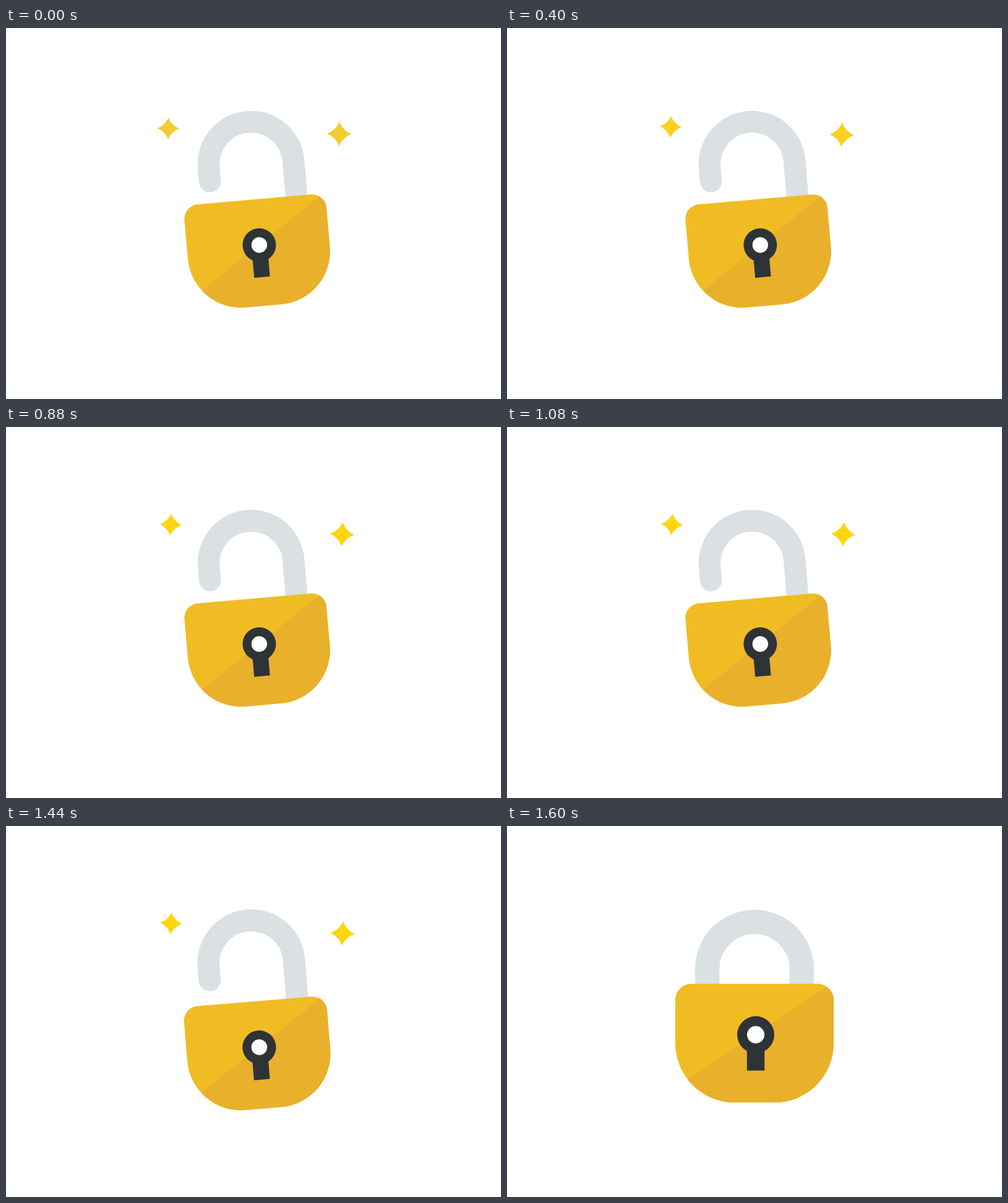
Animation, 800 px wide and 600 px high, one loop 2.6 s. Source, as an HTML page:

```html
<!DOCTYPE html>
<html lang="en">
<head>
<meta charset="utf-8">
<title>Padlock</title>
<style>
  html, body { margin: 0; width: 100%; height: 100%; overflow: hidden; background: #fff; }
  svg { display: block; width: 100vw; height: 100vh; }
</style>
</head>
<body>
<svg viewBox="0 0 800 600">
  <defs>
    <clipPath id="bodyClip">
      <path id="bodyShape" d="M-102-96H102A26 26 0 0 1 128-70V0A96 96 0 0 1 32 96H-32A96 96 0 0 1-128 0V-70A26 26 0 0 1-102-96Z"/>
    </clipPath>
  </defs>
  <g id="shackle" fill="none" stroke="#dbe0e3" stroke-width="39.4">
    <path d="M-76.3 24.3V0A76.3 76.3 0 0 1 76.3 0V80" stroke-linecap="round"/>
  </g>
  <g id="body">
    <use href="#bodyShape" fill="#f1bc23"/>
    <path d="M128-98.7L-128 72.3V96H128Z" fill="#e9b02b" clip-path="url(#bodyClip)"/>
    <path d="M-12.2-4H16.2V44.2H-12.2Z" fill="#2e3337"/>
    <circle cx="2" cy="-13.7" r="30" fill="#2e3337"/>
    <circle cx="2" cy="-13.7" r="14.1" fill="#fff"/>
  </g>
  <path id="starL"/>
  <path id="starR"/>
</svg>
<script>
const LOOP = 2600, STEP = 40;
const CLOSE_AT = 1280, CLOSED = 1600, POP_AT = 1440, DRIFT = 1360;

const $ = id => document.getElementById(id);
const clamp = x => Math.min(1, Math.max(0, x));
const mix = (a, b, p) => a + (b - a) * p;
const span = (t, from, to) => clamp((t - from) / (to - from));
const backIn = (x, k) => (k + 1) * x ** 3 - k * x ** 2;

const stars = [
  { el: $('starL'), r: 17.6, x: 262.4, y: 162.5, dx: 4.3, dy: -5.2 },
  { el: $('starR'), r: 19.5, x: 538.5, y: 171.2, dx: 5.4, dy: 2.5 }
];
for (const { el, r } of stars) {
  const c = r * 0.29;
  el.setAttribute('d',
    `M0 ${-r}Q${c} ${-c} ${r} 0Q${c} ${c} 0 ${r}Q${-c} ${c} ${-r} 0Q${-c} ${-c} 0 ${-r}Z`);
}

function place(el, x, y, angle, scale) {
  el.setAttribute('transform', `translate(${x} ${y}) rotate(${angle}) scale(${scale})`);
}

function drawLock(t) {
  const x = span(t, CLOSE_AT, CLOSED);
  const turn = x ** 4;
  const scale = mix(0.9, 1, turn);
  const angle = mix(-5, 0, turn);
  const cx = mix(396.1, 400, turn);
  const cy = mix(220.3, 231.4, x ** 3);
  // The body dips away from the shackle before it snaps shut.
  const gap = scale * mix(159.6, 119.9, backIn(x, 2));
  const rad = angle * Math.PI / 180;
  place($('shackle'), cx, cy, angle, scale);
  place($('body'), cx - gap * Math.sin(rad), cy + gap * Math.cos(rad), angle, scale);
}

function drawStars(t) {
  const p = 1 - (1 - span(t, 0, DRIFT)) ** 2;
  const size = 1 - backIn(span(t, POP_AT, CLOSED), 1.7);
  const color = `rgb(${mix(244, 255, p)} ${mix(204, 213, p)} ${mix(48, 17, p)})`;
  for (const s of stars) {
    place(s.el, s.x + s.dx * p, s.y + s.dy * p, mix(1, 3, p), size);
    s.el.setAttribute('fill', color);
    s.el.setAttribute('visibility', t < CLOSED ? 'visible' : 'hidden');
  }
}

function draw(ms) {
  const t = Math.floor((ms % LOOP) / STEP) * STEP;
  drawLock(t);
  drawStars(t);
}

const start = performance.now();
function tick() {
  draw(performance.now() - start);
  requestAnimationFrame(tick);
}
draw(0);
requestAnimationFrame(tick);
</script>
</body>
</html>
```
